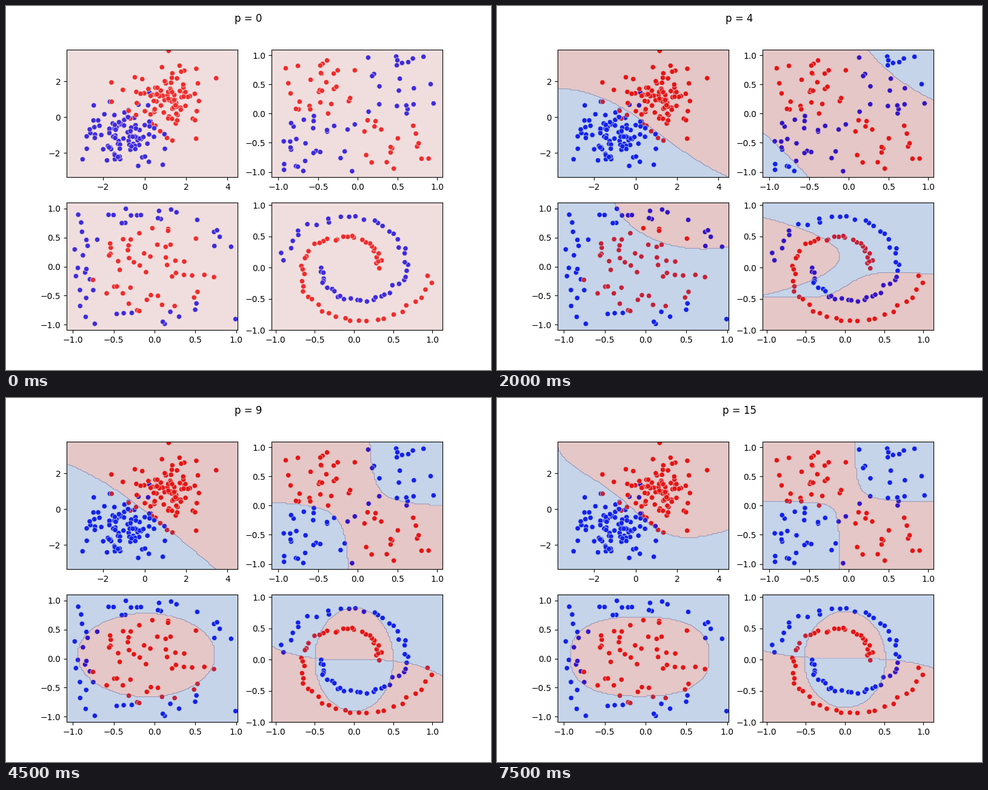
Animation of 800x600 px, one loop 8 s. Source, as a matplotlib script:

```python
import numpy as np
import matplotlib.pyplot as plt
from matplotlib.animation import ArtistAnimation

STEPS = 16
GRID = 100
RED, BLUE = "#ff0000", "#0000ff"
RED_AREA, BLUE_AREA, PLAIN_AREA = "#ac4848", "#4173b9", "#d09494"
EDGE = "#4a72b8"

plt.rcParams["font.family"] = "DejaVu Sans"
rng = np.random.default_rng(11)


# Data sets: points and whether each one is red

def blobs(n=100, spread=0.93):
    red = np.arange(2 * n) >= n
    center = np.where(red, 1, -1)[:, None]
    pts = rng.normal(center, spread, (2 * n, 2))
    order = rng.permutation(2 * n)
    return pts[order], red[order]


def quadrants(n=100):
    pts = rng.uniform(-1, 1, (n, 2))
    return pts, pts.prod(axis=1) < 0


def disc(n=98):
    pts = rng.uniform(-1, 1, (n, 2))
    return pts, np.hypot(*pts.T) < 0.8


def spirals(n=51, noise=0.022):
    t = np.linspace(0, 0.98, n)
    arms = []
    for start, growth, turn in [(0.40, 0.55, np.pi), (0.30, 0.73, 0)]:
        r, angle = start + growth * t, turn + 2 * np.pi * t
        arms.append(np.column_stack([r * np.cos(angle), r * np.sin(angle)]))
    pts = np.vstack(arms) + rng.normal(0, noise, (2 * n, 2))
    return pts, np.arange(2 * n) >= n


# Decision fields: positive where the prediction is red

def signed_root(v):
    return np.sign(v) * np.sqrt(np.abs(v))


def diagonal(*heights):
    """Boundary across the main diagonal, through five evenly spaced heights."""
    curve = np.polyfit([-4, -2, 0, 2, 4], heights, 4)
    return lambda x, y: (x + y - np.sqrt(2) * np.polyval(curve, (x - y) / np.sqrt(2))) / np.sqrt(2)


def corners(top, bottom):
    """Blue beyond two hyperbolas (a, b, c): |x - a| |y - b| > c."""
    def branch(x, y, a, b, c, side):
        dx, dy = np.maximum(side * (x - a), 0), np.maximum(side * (y - b), 0)
        return np.sqrt(dx * dy) - np.sqrt(c)
    return lambda x, y: -np.maximum(branch(x, y, *top, 1), branch(x, y, *bottom, -1))


def oval(cx, cy, rx, ry, n=2):
    def field(x, y):
        q = np.abs((x - cx) / rx) ** n + np.abs((y - cy) / ry) ** n
        return (1 - q ** (1 / n)) * min(rx, ry)
    return field


def below(a, b):
    return lambda x, y: a + b * x - y


def tongue(x, y):
    left = -2.7 * (y - 0.27) ** 2 - x
    floor = -0.46 + 0.36 * np.tanh(3.5 * (x - 0.03)) - y
    return np.maximum(left, floor)


def wedge(x, y):
    right = np.minimum(x - 0.084 - 0.16 * y, y + 0.75 - 0.69 * x)
    return -np.maximum(right, y - 1.23 - 1.27 * x)


def swirl(a, b, rx, ry):
    """Red below a bent line, with the colours swapped inside an oval."""
    inner = oval(0, 0, rx, ry)
    return lambda x, y: signed_root((y - a + b * x ** 3) * inner(x, y))


# Each panel: data, limits, fields at the key steps
panels = [
    (blobs, (-3.757, 4.482), (-3.342, 3.777), {
        2: diagonal(-1.15, -0.9, -0.5, -0.12, -0.1),
        5: diagonal(-1.95, -0.17, 0.32, 0.37, 0.7),
        7: diagonal(-0.75, -0.31, -0.03, 0.57, 1.25),
        9: diagonal(-0.7, -0.25, -0.05, 0.03, 0.06),
        11: diagonal(2.5, -0.15, -0.2, 0.35, 3.6),
        15: diagonal(-0.42, -0.15, -0.09, 0.08, 2.4),
    }),
    (quadrants, (-1.0864, 1.068), (-1.0875, 1.0955), {
        2: corners((-2, -0.45, 3.45), (3, 4.36, 26)),
        5: corners((-1, -2.1, 3.96), (3, 4.36, 16.1)),
        7: corners((-0.25, 0.2, 0.17), (0.08, 0.25, 0.11)),
        9: corners((0.1, -0.06, 0.06), (-0.06, 0.12, 0.07)),
        11: corners((0, -0.7, 0.45), (-0.1, 0.2, 0.025)),
        15: corners((0.04, 0.03, 0.03), (-0.1, 0.09, 0.015)),
    }),
    (disc, (-1.0757, 1.015), (-1.093, 1.1035), {
        2: oval(12.7, 16.4, 20, 20),
        5: oval(0.45, 1.1, 0.9, 0.87),
        7: oval(-0.16, 0, 0.78, 0.79),
        9: oval(-0.1, 0.06, 0.84, 0.72),
        11: oval(-0.13, 0.05, 0.915, 0.76),
        15: oval(-0.07, 0.035, 0.85, 0.685, 2.5),
    }),
    (spirals, (-1.0511, 1.130), (-1.0, 1.0415), {
        1: below(-0.1, -0.9),
        2: below(0.08, -0.16),
        5: tongue,
        7: wedge,
        9: swirl(0, 0.18, 0.5, 0.83),
        11: swirl(0.05, 0.12, 0.52, 0.78),
        15: swirl(0.02, 0.11, 0.52, 0.77),
    }),
]


def is_red(fields, p, x, y):
    """Predicted class, blending the fields of the key steps around p."""
    keys = sorted(fields)
    p = max(p, keys[0])
    lo = max(k for k in keys if k <= p)
    hi = min(k for k in keys if k >= p)
    t = (p - lo) / max(hi - lo, 1)
    return ((1 - t) * fields[lo](x, y) + t * fields[hi](x, y) > 0).astype(float)


fig, axs = plt.subplots(2, 2, figsize=(8, 6), dpi=100)
axs = axs.ravel()
for ax, (data, xlim, ylim, _) in zip(axs, panels):
    pts, red = data()
    ax.scatter(*pts.T, s=36, c=np.where(red, RED, BLUE), edgecolors="white", linewidths=0.48)
    wide = data is blobs
    ax.set_xticks([-2, 0, 2, 4] if wide else np.linspace(-1, 1, 5))
    ax.set_yticks([-2, 0, 2] if wide else np.linspace(-1, 1, 5))
    ax.set(xlim=xlim, ylim=ylim)


def draw_step(p):
    artists = [fig.text(0.5, 0.98, f"p = {p}", ha="center", va="top", fontsize=12)]
    colors = [BLUE_AREA, RED_AREA if p else PLAIN_AREA]
    for ax, (_, xlim, ylim, fields) in zip(axs, panels):
        x, y = np.meshgrid(np.linspace(*xlim, GRID), np.linspace(*ylim, GRID))
        z = is_red(fields, p, x, y) if p else np.ones_like(x)
        artists.append(ax.contourf(x, y, z, levels=[-1, 0.5, 2], colors=colors, alpha=0.3))
        if z.min() < z.max():
            artists.append(ax.contour(x, y, z, levels=[0.5], colors=EDGE,
                                      linewidths=0.6, alpha=0.4))
    return artists


anim = ArtistAnimation(fig, [draw_step(p) for p in range(STEPS)],
                       interval=500, repeat=True, repeat_delay=0)
plt.show()
```
